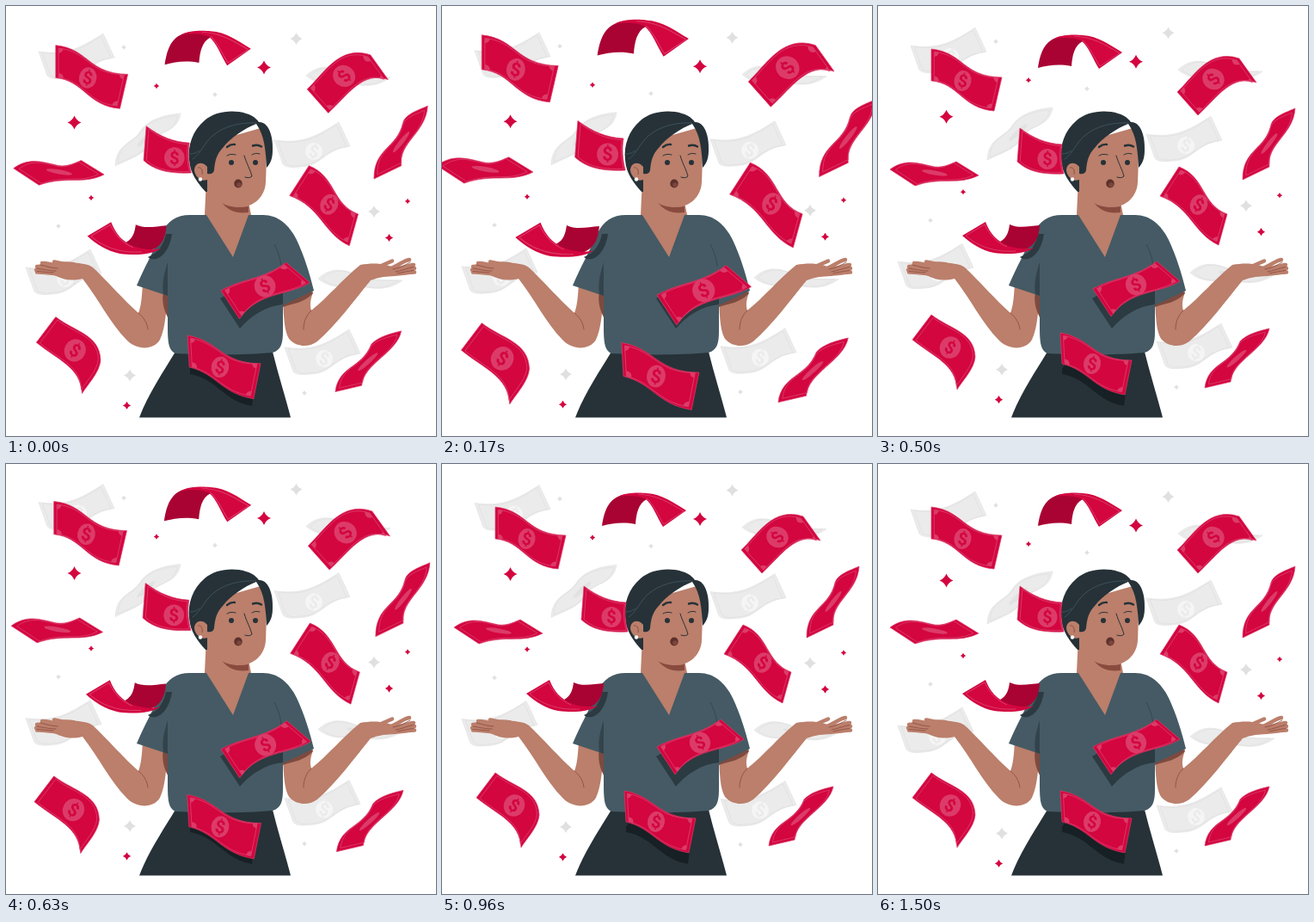
Animation of 500 by 500 pixels, one loop 1.54 s. Source, as an HTML page:

```html
<!DOCTYPE html>
<html lang="en">
<head>
<meta charset="utf-8">
<title>Flying money</title>
<style>
html, body { margin: 0; width: 100%; height: 100%; overflow: hidden; background: #fff; }
svg { display: block; width: 100vw; height: 100vh; }
text { font: 700 20px Roboto, Arial, sans-serif; text-anchor: middle; }
</style>
</head>
<body>
<svg viewBox="0 0 500 500">
  <defs id="defs"></defs>
  <g id="drift"></g>

  <g id="woman">
    <!-- arms and hands -->
    <g fill="#bb7f6b">
      <path d="M159 322C158 340 157 349 154 357C137 342 118 320 101 304C95 299 86 300 79 298C73 297 67 297 62 298L56 303L56 313C60 315 64 316 66 317C74 319 81 319 89 317C107 340 122 370 140 388C152 401 172 400 179 388C185 376 187 352 188 330Z"/>
      <path d="M322 340C323 365 324 380 330 388C340 398 354 396 362 390C384 371 406 341 424 319C434 315 444 314 454 314L452 304L442 301C433 299 423 299 412 301C392 317 374 339 355 354C353 347 354 342 357 333L352 318Z"/>
    </g>
    <g fill="none" stroke="#bb7f6b" stroke-width="4.500" stroke-linecap="round">
      <path d="M68 300L56 297.500M64 304C56 301 49 299 42 299M62 306C52 304 43 302 36 303M62 309C52 307 42 305 35 307M62 312C54 311 44 309 36 309.500"/>
      <path d="M434 303L449 296.500M438 308C452 306 461 296 469 295M442 308C456 307 465 302 474 301M444 310C456 309 466 306 475 305M440 312C455 312 466 310 475 309.500"/>
    </g>
    <g fill="none" stroke="#8a4b3f" stroke-width=".8" stroke-linecap="round">
      <path d="M40 301C48 303 54 305 60 305M36 305C46 307 52 308 58 308M36 308.500C43 309 49 310 55 310"/>
      <path d="M470 298C464 301 458 305 450 306M474 303.500C466 305 460 308 453 309M474 307.500C468 308 460 310 455 311"/>
      <path d="M154 357C159 361 164 367 165 376M355 354C349 360 346 367 346 376"/>
    </g>
    <path d="M183 330L188 334V362C183 352 181 343 183 330Z" fill="#7d4a3f"/>
    <path d="M322 344L352 330L357 334C347 345 334 346 322 350Z" fill="#7d4a3f"/>

    <!-- neck -->
    <path d="M233 200L231 243L252 294H272L285 243L282 228Z" fill="#bb7f6b"/>

    <!-- clothes -->
    <path d="M197 402H310C317 430 325 455 331 478.500H155C165 452 183 425 197 402Z" fill="#263238"/>
    <path d="M233 243H214C198 243 188 250 181 264C172 284 160 306 152 325L188 337V370C188 392 189 400 197 404C235 406 280 406 310 403C320 400 322 392 322 378V348L358 331C353 311 347 291 338 272C329 254 316 243 299 243H282L264 292Z" fill="#455a64"/>
    <path d="M188 298C184 311 181 322 183 335L188 337Z" fill="#33434b"/>
    <path d="M312 277C317 287 319 294 320 303" fill="none" stroke="#37474f" stroke-width="1"/>

    <!-- head -->
    <path d="M250 227C259 233 271 235 282 233V240C269 242 257 238 250 227Z" fill="#8a4b3f"/>
    <path d="M233 160L296 142C304 155 303 180 302 205C301 222 288 234 271 234C253 234 239 224 233 206Z" fill="#bb7f6b"/>
    <path d="M232 216C223 206 214 195 213 179C211 162 217 145 231 133C241 124 257 121 271 123C283 125 290 129 294 135C304 134 311 149 310 168C310 178 307 184 303 188C302 169 301 151 291 137C278 142 261 153 252 165C245 172 243 180 242 191C241 195 238 196 234 195V216Z" fill="#263238"/>
    <path d="M232 185C226 180 219 184 219 191C220 199 227 205 234 202V187Z" fill="#bb7f6b"/>
    <path d="M223 188C227 187 229 191 228 196" fill="none" stroke="#8a4b3f" stroke-width=".9"/>
    <circle cx="226" cy="201.500" r="2.200" fill="#fff"/>
    <path d="M217 178C226 172 230 160 240 151C254 139 274 135 291 136M214 172C219 172 222 170 225 168" fill="none" stroke="#455a64" stroke-width=".8"/>
    <g fill="#263238">
      <circle cx="262" cy="182" r="3"/>
      <circle cx="290" cy="182" r="3"/>
    </g>
    <path d="M257 164C260 161.500 263 160.500 266 161M287 162.500C290 161.500 294 161.500 297 163.500" fill="none" stroke="#263238" stroke-width="2.400" stroke-linecap="round"/>
    <path d="M257 174C260 172 264 172 267 173M286 173C289 171 292 171 295 172M277 174C280 184 284 190 286 198C284 200 281 200 278 199" fill="none" stroke="#263238" stroke-width="1" stroke-linecap="round"/>
    <ellipse cx="270" cy="206.500" rx="4.700" ry="5" fill="#5a302b"/>
    <ellipse cx="271" cy="208" rx="2.800" ry="2.800" fill="#7d453b"/>

    <!-- still shadows under the moving notes -->
    <path d="M165 292C178 287 184 276 186 265H193C191 280 182 297 168 294Z" fill="#2c3a41"/>
    <path d="M249 340L268 329L322 325V347C302 349 285 360 272 375Z" fill="#2c3a41"/>
    <path d="M214 422L222 410L289 440L286 465C254 460 246 434 214 428Z" fill="#172024"/>
  </g>

  <g id="money"></g>
</svg>

<script>
const NS = 'http://www.w3.org/2000/svg';
const byId = id => document.getElementById(id);
const drift = byId('drift'), money = byId('money'), defs = byId('defs');
const RED = '#d3063f', DARK = '#a90333', PINK = '#dc3b69';
const GREY = '#ebebeb', LINE = '#e2e2e2', PALE = '#f5f5f5';

function add(parent, tag, attrs, text) {
  const el = document.createElementNS(NS, tag);
  for (const k in attrs) el.setAttribute(k, attrs[k]);
  if (text) el.textContent = text;
  parent.appendChild(el);
  return el;
}

let clips = 0;

// A note: outline, inset frame, corner dots, and a seal or a streak.
function note(parent, d, cx, cy, rot, opt = {}) {
  const { fill = RED, line = PINK, seal = line, rx = 10, ry = 12, sign = true, inset = .91, at = '' } = opt;
  const g = add(parent, 'g', { transform: at });
  add(g, 'path', { d, fill, stroke: line, 'stroke-width': .7 });

  const id = 'c' + clips++;
  const shrink = `translate(${cx} ${cy}) scale(${inset}) translate(${-cx} ${-cy})`;
  add(add(defs, 'clipPath', { id }), 'path', { d });
  const inner = add(g, 'g', { transform: shrink });
  add(inner, 'path', { d, fill: 'none', stroke: line, 'stroke-width': 1 });

  const n = d.match(/-?[\d.]+/g);
  if (n.length === 16) {
    const dots = add(inner, 'g', { 'clip-path': `url(#${id})` });
    for (const i of [0, 6, 8, 14]) add(dots, 'circle', { cx: n[i], cy: n[i + 1], r: 6, fill: line });
  }
  const mid = add(g, 'g', { transform: `translate(${cx} ${cy}) rotate(${rot})` });
  add(mid, 'ellipse', { rx, ry, fill: seal });
  if (sign) add(mid, 'text', { y: 7, fill }, '$');
}

function sparkle(x, y, r, fill) {
  const q = r * .28;
  add(drift, 'path', {
    d: `M0 ${-r}Q${q} ${-q} ${r} 0Q${q} ${q} 0 ${r}Q${-q} ${q} ${-r} 0Q${-q} ${-q} 0 ${-r}Z`,
    transform: `translate(${x} ${y})`, fill
  });
}

// Pale notes behind
const pale = { fill: GREY, line: LINE, seal: PALE, rx: 10, ry: 10 };
const paleThin = { ...pale, seal: LINE, rx: 14, ry: 3, sign: false };
const wave = 'M312 156C345 161 362 151 387 135L400 163C369 167 368 186 342 187C332 188 326 188 322 184Z';
for (const [x, y] of [[0, 0], [-274, -103], [-289, 148], [12, 241]])
  note(drift, wave, 358, 169, 14, { ...pale, at: `translate(${x} ${y})` });
const ribbon = 'M363 317C380 301 397 308 412 314C429 320 445 319 461 319C444 331 430 329 412 326C398 324 382 332 363 317Z';
for (const [x, y] of [[0, 0], [-14, -236]])
  note(drift, ribbon, 410, 319, 12, { ...paleThin, at: `translate(${x} ${y})` });
note(drift, 'M203 125C199 149 176 144 167 160C160 174 142 178 127 186C128 160 147 160 156 146C166 130 190 126 203 125Z',
  163, 154, -42, paleThin);

for (const [x, y, r] of [[337.5, 38, 7], [137, 48, 3], [243, 103, 3], [61, 256, 3], [428, 239, 7], [144, 429.5, 7], [347, 450, 3]])
  sparkle(x, y, r, '#e0e0e0');
for (const [x, y, r] of [[79.5, 135.5, 8], [300, 71.5, 8], [175, 93, 3.2], [99, 223, 3.2], [467, 227, 3.2], [445.5, 269.5, 4.6], [140.5, 464.5, 4.6]])
  sparkle(x, y, r, RED);

// Red notes
const thin = { sign: false, rx: 15, ry: 2.6, inset: .88 };
note(money, 'M62 50C100 54 98 82 144 83L135 122C98 119 94 90 62 87Z', 98.5, 87, 10);
note(money, 'M348 100C367 82 385 49 420 61L440 89C411 79 395 106 372 127Z', 390, 85, -55, { rx: 12, ry: 13 });
note(money, 'M350 187C381 199 376 231 406 242L396 278C366 264 364 234 328 221Z', 373, 231, 25);
note(money, 'M250 329C274 315 297 317 324 297L351 320C327 335 292 330 271 361Z', 300, 324, -25, { rx: 12, ry: 12.5 });
note(money, 'M212 380C248 386 250 412 295 412L287 452C250 446 246 424 214 416Z', 249, 416, 10);
note(money, 'M62 359C84 376 112 379 113 408C112 422 98 436 92 446C90 416 66 409 40 388Z', 84, 397, 30, { rx: 12, ry: 13 });
note(money, 'M165 142C181 154 196 160 214 161C212 172 213 184 216 195C195 196 176 194 162 181Z', 197, 178, 0, { rx: 11.5, ry: 12 });
note(money, 'M485 119C483 150 452 160 455 187L424 202C424 166 450 168 457 138C460 128 474 124 485 119Z', 455, 160, -52, thin);
note(money, 'M455 375C450 400 412 412 410 437L380 444C384 414 410 418 421 390C428 382 442 378 455 375Z', 417, 410, -42, thin);
note(money, 'M14 190C33 176 50 184 66 187C76 188 84 184 91 181L117 197C93 209 74 198 43 209Z', 66, 194, 10, thin);

// Two curled notes
const shape = (d, fill) => add(money, 'path', { d, fill });
const edge = d => add(money, 'path', { d, fill: 'none', stroke: PINK, 'stroke-width': 1 });
shape('M186 72C189 52 195 37 216 35C229 34 236 37 238 41C228 46 226 58 225 70C210 67 198 69 186 72Z', DARK);
shape('M205 38C213 33 229 33 238 34C256 35 269 45 284 54L257 73C250 62 245 47 236 40C228 37 215 36 205 38Z', RED);
edge('M228 35C250 36 264 45 281 55L258 70C252 61 247 48 238 40');
shape('M153 254C163 259 176 256 188 255C187 270 182 280 168 284C155 282 146 278 142 274C150 270 152 262 153 254Z', DARK);
shape('M98 267L125 251C130 264 138 274 152 279C163 283 176 283 182 281C170 289 150 289 135 287C120 284 108 276 98 267Z', RED);
edge('M160 285C142 286 120 283 102 267L124 254C130 266 138 275 150 280');

const LOOP = 1540, FPS = 24;
const CX = 249.5, CY = 243.5;
const BEAT = 152; // a tenth of the heartbeat cycle

// Double beat: quick rise, slow fall, pause, quick rise, quick fall, rest.
function beat(ms) {
  const p = ms / BEAT;
  if (p < 1) return p;
  if (p < 3) return (3 - p) / 2;
  if (p < 4) return 0;
  return Math.max(0, 1 - Math.abs(p - 5));
}

function draw(now) {
  const t = Math.floor(((now % LOOP) + 4) * FPS / 1000) * 1000 / FPS;
  const s = 1 + .1 * beat(t + 34);
  const y = -4.5 * (1 - Math.cos(2 * Math.PI * (t + 20) / LOOP));
  money.setAttribute('transform', `translate(${CX} ${CY}) scale(${s}) translate(${-CX} ${-CY})`);
  drift.setAttribute('transform', `translate(0 ${y})`);
}

const start = performance.now();
function tick() {
  draw(performance.now() - start);
  requestAnimationFrame(tick);
}
tick();
</script>
</body>
</html>
```
